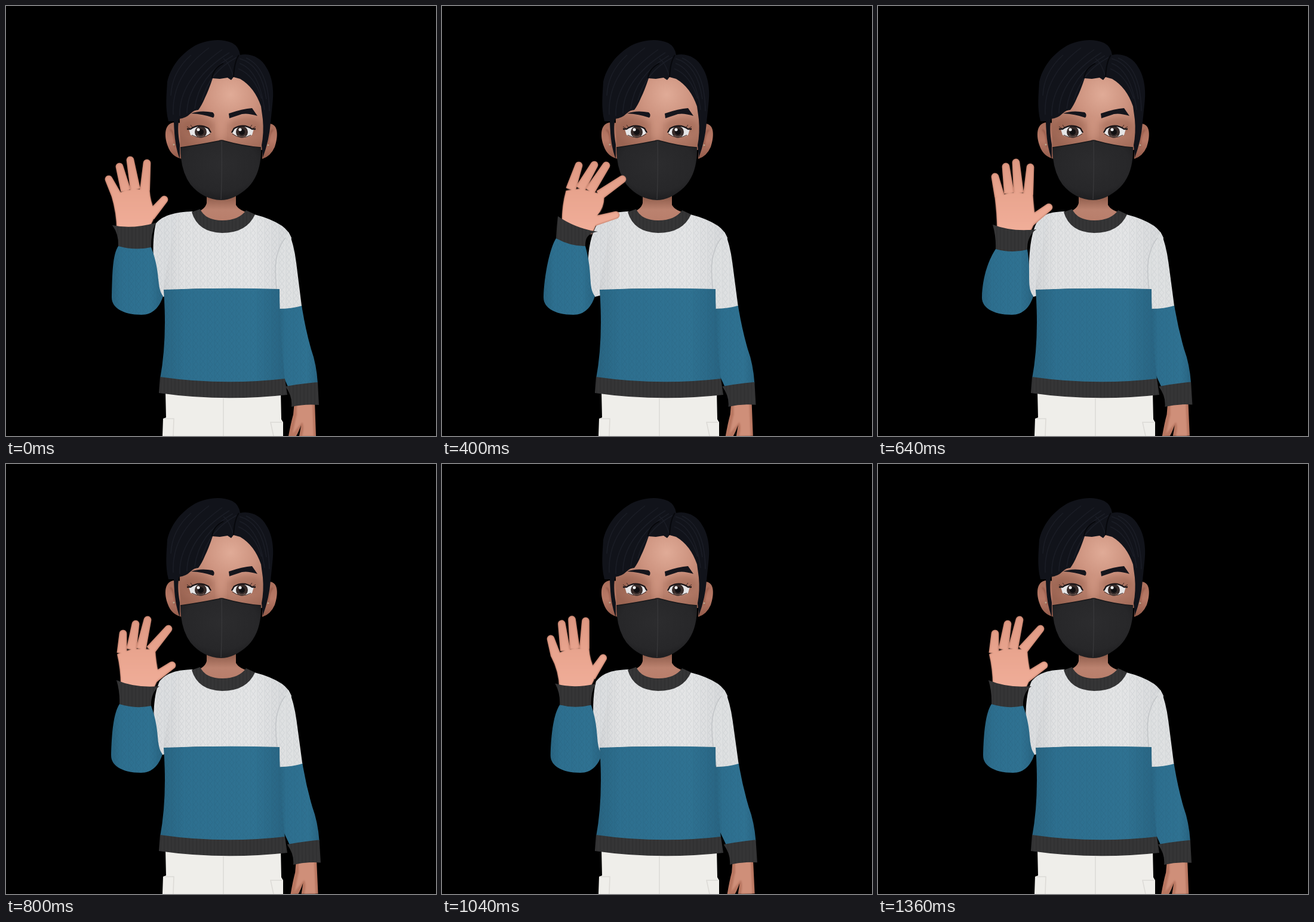
An HTML page that plays this animation: 720x720 px, repeating every 1440 ms.

```html
<!DOCTYPE html>
<html lang="en">
<head>
<meta charset="utf-8">
<title>Waving avatar</title>
<style>
  html, body { margin: 0; width: 100%; height: 100%; overflow: hidden; background: #000; }
  svg { display: block; width: 100%; height: 100%; }
  .strands { fill: none; stroke: #232630; stroke-width: 1.5; opacity: .55; }
</style>
</head>
<body>
<svg viewBox="0 0 720 720">
  <defs>
    <radialGradient id="skin" gradientUnits="userSpaceOnUse" cx="376" cy="148" r="110">
      <stop offset="0" stop-color="#e0ab97"/><stop offset=".4" stop-color="#cc927e"/>
      <stop offset=".75" stop-color="#ae7663"/><stop offset="1" stop-color="#9a6452"/>
    </radialGradient>
    <linearGradient id="neck" x2="0" y2="1">
      <stop offset="0" stop-color="#80503f"/><stop offset=".45" stop-color="#bb826f"/><stop offset="1" stop-color="#b67b68"/>
    </linearGradient>
    <linearGradient id="ear" x2="0" y2="1">
      <stop offset="0" stop-color="#a86d5a"/><stop offset=".5" stop-color="#b87966"/><stop offset="1" stop-color="#935b4a"/>
    </linearGradient>
    <linearGradient id="palm" gradientUnits="userSpaceOnUse" x1="0" y1="255" x2="0" y2="370">
      <stop offset="0" stop-color="#dd9781"/><stop offset=".5" stop-color="#e8a48e"/><stop offset="1" stop-color="#f0ad98"/>
    </linearGradient>
    <linearGradient id="white">
      <stop offset="0" stop-color="#d3d5d7"/><stop offset=".15" stop-color="#e1e2e3"/>
      <stop offset=".7" stop-color="#e4e5e6"/><stop offset="1" stop-color="#d6d8da"/>
    </linearGradient>
    <linearGradient id="blue">
      <stop offset="0" stop-color="#286481"/><stop offset=".2" stop-color="#2d6f8f"/>
      <stop offset=".75" stop-color="#2f7292"/><stop offset="1" stop-color="#286482"/>
    </linearGradient>
    <radialGradient id="mask" cx=".5" cy=".4" r=".65">
      <stop offset="0" stop-color="#2c2c2e"/><stop offset=".7" stop-color="#272729"/><stop offset="1" stop-color="#1b1b1d"/>
    </radialGradient>
    <pattern id="knit" width="12" height="10" patternUnits="userSpaceOnUse">
      <path d="M1 0v10M2 0l4 5-4 5M10 0l-4 5 4 5" fill="none" stroke="#123" stroke-opacity=".06" stroke-width="1.2"/>
    </pattern>
    <pattern id="rib" width="6" height="6" patternUnits="userSpaceOnUse">
      <rect width="6" height="6" fill="#353536"/><path d="M1 0v6" stroke="#2f2f30" stroke-width="1.5"/>
    </pattern>
    <filter id="soft"><feGaussianBlur stdDeviation="1"/></filter>
    <filter id="haze"><feGaussianBlur stdDeviation="5"/></filter>
    <path id="chest" d="M312 344L288 348 276 400 263 476Q360 470 459 476L478 388Q473 376 462 368Q444 356 416 349Q362 400 312 344Z"/>
    <path id="belly" d="M264 475Q362 471 458 474Q458 540 467 626Q362 637 258 624Q270 560 264 475Z"/>
    <path id="armTop" d="M473 378Q482 398 486 430L495 502Q478 507 457 507Q451 470 451 440Q454 400 473 378Z"/>
    <path id="armLow" d="M455 507Q478 506 495 501Q501 540 511 575Q520 600 522 632Q495 636 472 637L455 600Z"/>
    <path id="sleeve"/>
    <path id="upperArm"/>
  </defs>
  <rect width="720" height="720"/>

  <!-- head -->
  <path d="M283 195C265 195 264 217 271 235Q277 252 294 256V196ZM438 197C457 195 456 218 450 236Q443 252 429 256V200Z" fill="url(#ear)"/>
  <path d="M275 207Q283 212 283 236M447 207Q439 213 439 236" fill="none" stroke="#84493a" stroke-width="3" opacity=".5" filter="url(#soft)"/>
  <path d="M336 312H385V333Q390 343 412 348Q396 382 362 376Q328 374 314 347Q333 342 336 330Z" fill="url(#neck)"/>
  <path d="M290 150Q300 110 360 105Q422 105 431 170V240Q362 265 292 240Z" fill="url(#skin)"/>
  <g fill="#7d4636" opacity=".28" filter="url(#haze)">
    <ellipse cx="322" cy="200" rx="25" ry="15"/><ellipse cx="400" cy="200" rx="26" ry="15"/>
  </g>
  <ellipse cx="360" cy="209" rx="8" ry="20" fill="#d79c87" opacity=".5" filter="url(#haze)"/>
  <g id="eye">
    <path d="M306 206Q323 195 341 207L343 212Q329 226 309 216Z" fill="#e6e5e6"/>
    <circle cx="326" cy="211" r="10" fill="#382c2a"/>
    <circle cx="326" cy="211" r="5" fill="#121012"/>
    <path d="M320 217Q326 222 332 217" fill="none" stroke="#6d5b55" stroke-width="2"/>
    <path d="M303 206L309 206Q323 196 339 205L343 212" fill="none" stroke="#1b1517" stroke-width="2.4"/>
    <path d="M311 216Q327 225 342 214M308 205l-5-3M312 203l-3-4" fill="none" stroke="#3c2723" stroke-width="1"/>
  </g>
  <use href="#eye" transform="matrix(-1 0 0 1 721 0)"/>
  <g fill="#fff"><circle cx="322" cy="207" r="2.5"/><circle cx="392" cy="207" r="2.5"/></g>
  <path d="M310 180Q325 174 346 178Q351 182 347 187Q330 181 310 180ZM373 180Q396 172 412 171L421 184Q405 179 395 181L374 188Z" fill="#15151c"/>
  <path d="M292 237Q321 233 356 226Q361 224 366 226Q398 235 427 237Q428 281 405 304Q382 325 360 325Q330 324 309 299Q292 276 292 237Z" fill="url(#mask)"/>
  <path d="M361 226Q362 280 360 324" fill="none" stroke="#38383a" stroke-width="1.3"/>
  <path d="M292 237Q321 233 356 226Q361 224 366 226Q398 235 427 237" fill="none" stroke="#18181a" stroke-width="1.5"/>
  <path d="M272 193C266 170 269 147 270 127C275 104 291 81 317 66C336 57 359 53 379 62Q390 68 392 82C411 78 428 88 436 103C447 120 449 145 446 166L443 195Q441 224 430 254L428 233Q432 213 430 190L427 168Q416 136 392 122L381 119L377 124L371 120L358 122L346 121Q339 142 333 154Q328 166 322 174Q315 174 309 180Q301 188 290 189Q286 204 291 232V256Q282 235 281 193Z" fill="#11131a"/>
  <g class="strands">
    <path d="M280 182Q277 116 340 70M291 184Q289 124 362 73M303 180Q303 123 374 78M316 172Q322 117 380 83M328 158Q340 111 386 86M276 150Q278 110 310 82"/>
    <path d="M391 88Q428 98 436 156M391 96Q424 108 433 174M389 105Q416 116 428 155M402 87Q440 104 441 176M380 116Q374 95 364 88"/>
  </g>
  <path d="M390 82Q382 94 381 119M345 121Q347 104 364 96" fill="none" stroke="#07080c" stroke-width="2"/>
  <g fill="#b9a68e"><circle cx="281" cy="232" r="1.5"/><circle cx="439" cy="233" r="1.5"/></g>

  <!-- body -->
  <path d="M267 645H460L461 692L464 697V720H262L263 691L268 689Z" fill="#efeeea"/>
  <path d="M264 691H281L280 720M462 697H443L448 720M364 657V720" fill="none" stroke="#dcdad6" stroke-width="1.5"/>
  <g id="restingArm">
    <path d="M483 662H517L519 720H491Q493 709 494 702Q490 713 486 720H473Q477 698 481 684Z" fill="#b87660"/>
    <path d="M487 666H513L515 720H496Q500 704 496 697L480 716Q484 695 487 684Z" fill="#cf8f79" filter="url(#soft)"/>
    <use href="#armLow" fill="url(#blue)"/><use href="#armLow" fill="url(#knit)"/>
    <path d="M468 637Q497 632 522 630L524 668Q502 666 478 671Q480 654 468 637Z" fill="url(#rib)"/>
  </g>
  <use href="#upperArm" fill="#dcdee0"/><use href="#upperArm" fill="url(#knit)"/>
  <use href="#chest" fill="url(#white)"/><use href="#chest" fill="url(#knit)"/>
  <g id="restingTop">
    <use href="#armTop" fill="#dfe1e2"/><use href="#armTop" fill="url(#knit)"/>
    <path d="M468 388Q452 408 451 440Q451 470 458 507" fill="none" stroke="#b4b8bb" stroke-width="1.5" opacity=".6"/>
  </g>
  <use href="#belly" fill="url(#blue)"/><use href="#belly" fill="url(#knit)"/>
  <path d="M258 621Q362 636 467 624L471 651Q362 663 256 648Z" fill="url(#rib)"/>
  <path d="M311 345L325 340Q334 359 362 359Q390 359 402 342L417 349Q403 380 362 380Q321 379 311 345Z" fill="url(#rib)"/>

  <!-- waving arm -->
  <use href="#sleeve" fill="url(#blue)"/><use href="#sleeve" fill="url(#knit)"/>
  <path id="handEdge" fill="#c6826d"/>
  <path id="handFace" fill="url(#palm)" filter="url(#soft)"/>
  <path id="cuff" fill="url(#rib)"/>
</svg>
<script>
const LOOP = 1440, STEP = 80;

// Each pose: five fingertips (little finger to thumb), four cuff corners, elbow x, hand lean.
const left    = [172,290, 190,269, 208,258, 236,263, 265,324, 178,367, 251,363, 188,402, 243,404, 177, -6];
const right   = [211,288, 232,267, 246,266, 268,273, 296,343, 203,361, 272,379, 199,398, 253,410, 176, 2];
const bent    = [229,267, 255,266, 275,267, 302,290, 291,350, 194,352, 261,378, 191,389, 240,402, 170, 12];
const upright = [196,286, 214,269, 231,262, 255,270, 286,337, 192,366, 265,374, 197,407, 250,408, 174, -1];
const far     = [164,294, 181,268, 201,257, 225,258, 251,313, 179,371, 247,360, 195,406, 246,398, 185, -16];
const back    = [196,284, 217,268, 237,261, 272,276, 278,337, 185,362, 257,372, 190,402, 243,405, 176, -3];

const mix = (a, b, k) => a.map((v, i) => v + (b[i] - v) * k);

// Three waves per loop: swing right, bend over, fall back left.
const keys = [
  [0, left], [80, mix(right, left, 1.12)], [240, right], [400, bent], [480, back], [560, left],
  [640, upright], [720, mix(upright, right, 1.5)], [800, back],
  [880, far], [960, mix(right, far, 1.2)], [1120, right], [1280, bent], [1360, back]
];

function keyAt(i) {
  const n = keys.length, [time, pose] = keys[(i + n) % n];
  return [time + Math.floor(i / n) * LOOP, pose];
}

// Smooth curve through the poses, wrapping at the loop.
function poseAt(t) {
  let i = keys.length - 1;
  while (keys[i][0] > t) i--;
  const [[t0, a], [t1, b], [t2, c], [t3, d]] = [-1, 0, 1, 2].map(o => keyAt(i + o));
  const span = t2 - t1, u = (t - t1) / span, v = 1 - u;
  return b.map((p, j) => {
    const m1 = (c[j] - a[j]) / (t2 - t0) * span, m2 = (d[j] - p) / (t3 - t1) * span;
    return v * v * (1 + 2 * u) * p + u * v * v * m1 + u * u * (3 - 2 * u) * c[j] - u * u * v * m2;
  });
}

function finger([bx, by], [tx, ty], r) {
  const len = Math.hypot(tx - bx, ty - by), nx = (ty - by) / len * r, ny = (bx - tx) / len * r, k = 1.35;
  return `M${bx + nx * k} ${by + ny * k}L${tx + nx} ${ty + ny}A${r} ${r} 0 0 1 ${tx - nx} ${ty - ny}L${bx - nx * k} ${by - ny * k}Z`;
}

function handPath(pts, lean, inset) {
  const [tl, tr] = pts.slice(5), w = mix(tl, tr, .1), e = mix(tl, tr, .85), mid = mix(tl, tr, .5);
  const knuckles = [-24, -8, 8, 24].map((o, i) =>
    [mid[0] + lean + o, mid[1] - 57 + o * lean * .02 + [5, 0, 0, 3][i]]);
  const thumb = mix(tl, tr, .8).map((v, i) => v + [5, -12][i]);
  const [a, b, c, d] = knuckles;
  const palm = `M${w[0] + inset} ${w[1] + 8}Q${w[0]} ${w[1] - 20} ${a[0] - 8 + inset} ${a[1] + 2}` +
    `L${b} ${c} ${d[0] + 8 - inset} ${d[1]}Q${d[0] + 9} ${d[1] + 20} ${thumb[0] + 7} ${thumb[1] - 10}` +
    `L${thumb[0] + 5} ${thumb[1] + 6} ${e[0] - inset} ${e[1] + 8}Z`;
  return palm + knuckles.concat([thumb]).map((k, i) => finger(k, pts[i], 6.3 - inset)).join('');
}

const el = id => document.getElementById(id);
const setPath = (id, d) => el(id).setAttribute('d', d);

function draw(t) {
  const p = poseAt(t), lean = p[19], x = p[18];
  const pts = Array.from({ length: 9 }, (_, i) => [p[2 * i], p[2 * i + 1]]);
  const [tl, tr, bl, br] = pts.slice(5), top = mix(tl, tr, .45), low = mix(bl, br, .5);
  setPath('handEdge', handPath(pts, lean, 0));
  setPath('handFace', handPath(pts, lean, 1));
  setPath('cuff', `M${tl}Q${top[0]} ${top[1] + 9} ${tr}Q${br[0] - 1} ${br[1] - 22} ${br}Q${low[0]} ${low[1] + 7} ${bl}Q${bl[0] + 1} ${bl[1] - 20} ${tl}Z`);
  setPath('sleeve', `M${bl}C${bl[0] - 10} ${bl[1] + 15} ${x + 1} 450 ${x} 488C${x} 506 ${x + 20} 517 ${x + 50} 517` +
    `C${x + 68} 517 ${x + 80} 505 ${x + 86} 486C${x + 74} 470 ${x + 83} 448 ${br}Z`);
  setPath('upperArm', `M312 344C280 345 ${tr[0] + 10} 352 ${tr[0]} 364C${br[0]} 395 ${br[0] + 4} 450 ${x + 76} 470L${x + 86} 487 290 478Z`);
  const sway = t < 1120 ? t / 280 : (LOOP - t) / 80;
  for (const id of ['restingArm', 'restingTop'])
    el(id).setAttribute('transform', `rotate(${-sway * .21} 470 380)`);
}

const start = performance.now();
function tick() {
  const t = (performance.now() - start) % LOOP;
  draw(Math.floor(t / STEP) * STEP);
  requestAnimationFrame(tick);
}
tick();
</script>
</body>
</html>
```
